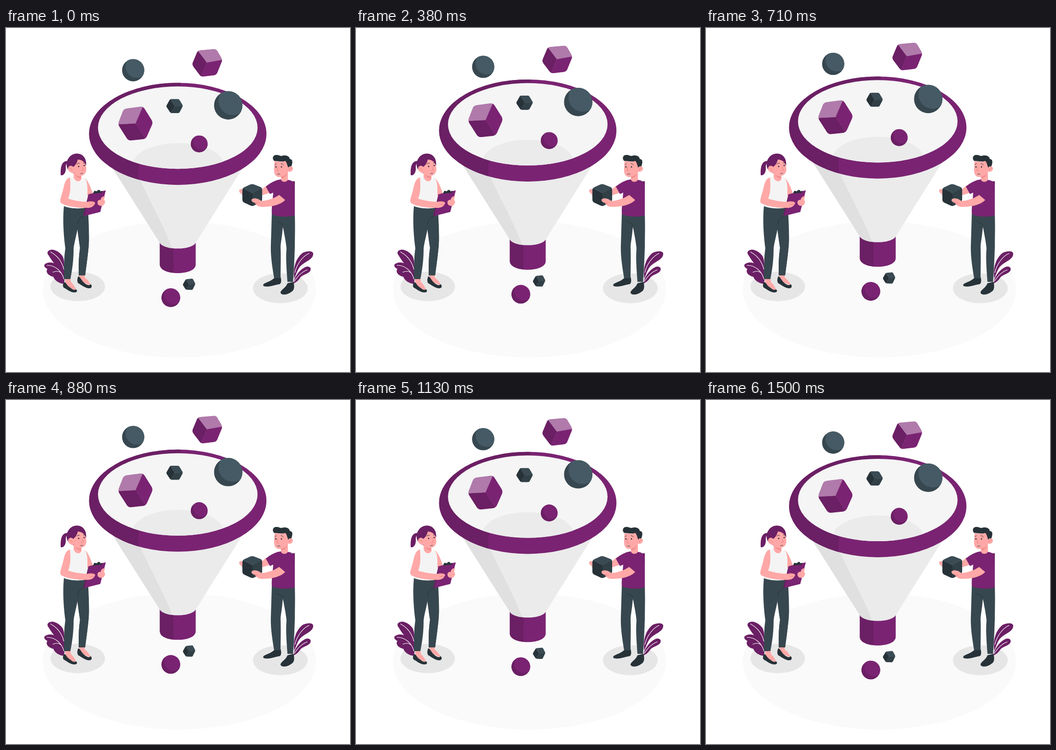
Write an HTML page that moves like this. It is 748x748 px and loops after 1540 ms.

```html
<!DOCTYPE html>
<html lang="en">
<head>
<meta charset="utf-8">
<title>Funnel</title>
<style>
  html, body { margin: 0; height: 100%; overflow: hidden; background: #fff; }
  svg { display: block; width: 100%; height: 100%; }
  .p { fill: #7a2372; } .pd { fill: #6b1f64; }
  .g { fill: #37474f; } .gd { fill: #263238; }
  .skin { fill: #ffa8a7; } .shade { fill: #f28f8f; }
  .line { fill: none; stroke-linecap: round; }
  .vein { stroke: #fff; stroke-width: 1.2; }
  .ink { stroke: #263238; stroke-width: 1; }
  .blush { stroke: #e87e80; stroke-width: 1; }
</style>
</head>
<body>
<svg viewBox="0 0 748 748">
  <defs>
    <clipPath id="rim"><ellipse cx="373.5" cy="231" rx="192.8" ry="111"/></clipPath>
    <clipPath id="mouth"><ellipse cx="373.5" cy="217.5" rx="173.5" ry="89.6"/></clipPath>
    <clipPath id="cone"><path d="M230 303L334.5 468C345 484.500 402 484.500 412.500 468L516 303Z"/></clipPath>
    <clipPath id="spout"><path d="M334.500 462H412.500V515C412.500 540 334.500 540 334.500 515Z"/></clipPath>
  </defs>

  <ellipse cx="377" cy="568.500" rx="297" ry="148" fill="#fafafa"/>
  <g fill="#e6e6e6">
    <ellipse cx="156" cy="562" rx="59.300" ry="32"/>
    <ellipse cx="596.500" cy="566" rx="59.500" ry="32.500"/>
  </g>

  <!-- plants -->
  <g class="pd">
    <path d="M127 531C111 524 100 506 91 492C88 486 94 482 101 482C110 483 118 489 123 496C127 504 127 516 127 531Z"/>
    <path d="M126 556C115 556 105 548 103 541C93 539 85 531 90 524C84 521 82 517 84 514C91 508 102 509 107 513C117 510 124 517 124 526C128 533 128 546 126 556Z"/>
    <path d="M627 545C623 521 631 500 645 489C655 484 669 484 668 492C667 504 650 508 641 517C634 524 631 535 627 545Z"/>
    <path d="M625 556C627 541 639 524 653 519C663 517 665 525 660 530C654 536 644 536 639 544C635 550 630 553 625 556Z"/>
  </g>
  <g class="line vein">
    <path d="M97 487C112 495 122 509 126 525"/>
    <path d="M89 516C107 516 121 528 126 546M102 531C109 528 115 528 120 533"/>
    <path d="M659 490C645 496 632 514 628 532M655 526C643 530 634 540 627 551"/>
  </g>

  <g id="float">
    <g clip-path="url(#spout)">
      <rect class="p" x="330" y="460" width="90" height="80"/>
      <rect class="pd" x="330" y="460" width="34" height="80"/>
    </g>
    <g clip-path="url(#cone)">
      <rect x="225" y="300" width="300" height="190" fill="#ebebeb"/>
      <path d="M225 300H281C290 340 345 430 362 482L330 485L225 320Z" fill="#e0e0e0"/>
    </g>
    <g clip-path="url(#rim)">
      <rect class="p" x="175" y="115" width="400" height="232"/>
      <path class="pd" d="M380 110H170V350H292C287 326 286 310 291 292L380 135Z"/>
    </g>
    <g clip-path="url(#mouth)">
      <rect x="195" y="125" width="360" height="190" fill="#f5f5f5"/>
      <ellipse cx="374" cy="300" rx="100" ry="49" fill="#ebebeb"/>
    </g>
  </g>

  <!-- woman -->
  <g>
    <path class="pd" d="M134 289C122 289 118 300 119 320C126 322 131 313 130 303C130 297 132 293 136 294Z"/>
    <path class="skin" d="M128 543H140L141 552C147 558 151 564 153 571L130 562Z"/>
    <path class="skin" d="M159 535H171V542C177 547 182 553 185 560L160 550Z"/>
    <path class="gd" d="M126 553C130 551 132 560 139 564C145 569 149 571 152 568C156 571 155 575 149 575C140 575 134 569 125 564C123 560 124 556 126 553Z"/>
    <path class="gd" d="M157 540C161 540 164 549 170 554C176 559 181 561 184 557C188 560 187 566 181 566C172 566 165 559 157 555C154 550 155 545 157 540Z"/>
    <path class="gd" d="M148 388L178 392C180 425 181 450 180 471C178 495 175 515 172 538H158C158 515 158 498 161 478C158 456 154 435 154 418Z"/>
    <path class="g" d="M155 395L177 392C179 425 181 450 180 471C178 495 175 515 172 538H158C158 515 158 498 161 478C158 460 156 445 156 428Z"/>
    <path class="g" d="M126 387C140 393 158 393 171 391C171 402 166 407 160 411C157 438 148 466 147 481C147 505 144 525 140 546H126C126 520 126 500 129 479C125 450 123 415 126 387Z"/>
    <path class="line ink" d="M156 427C156 417 161 412 169 409"/>
    <path class="skin" d="M169 326C178 328 183 345 189 359L178 366C173 353 168 340 169 326Z"/>
    <path fill="#f4f4f4" d="M139 325H148C152 336 165 337 169 325L174 330C178 342 177 354 177 363L171 391C156 394 140 392 127 388C132 376 135 367 134 350Z"/>
    <path class="skin" d="M147 309L163 313L164 324C167 333 153 339 147 325Z"/>
    <path class="shade" d="M150 318C154 322 158 323 163 322L163 326C157 327 152 324 150 318Z"/>
    <path class="pd" d="M133 304C128 289 139 273 154 273C168 273 176 285 174 300L147 316C141 314 136 311 133 304Z"/>
    <path class="skin" d="M146 302C151 299 155 292 156 286C164 286 172 291 174 300C176 309 174 316 169 319C162 324 150 321 147 315C141 316 135 311 135 306C135 300 142 297 146 302Z"/>
    <path class="line blush" d="M138 305C141 304 143 307 144 310M166 302L168 309L164 310"/>
    <g class="gd"><circle cx="158" cy="301" r="1.500"/><circle cx="170" cy="299" r="1.500"/></g>
    <path class="line ink" d="M154 296C156 294 158 294 160 294M168 293L172 294M162 317C164 316 166 316 167 316"/>
    <path class="p" d="M181 361L217 353L205 400L169 409Z"/>
    <path class="pd" d="M179 362L181 361L171 408L168 409Z"/>
    <path class="gd" d="M189 360L192 354L198 355C199 351 205 351 205 355L210 354L208 358Z"/>
    <path class="skin" d="M199 380C198 376 203 372 206 374C206 369 211 365 215 366L213 374C217 376 216 382 211 386C206 388 199 386 199 380Z"/>
    <path class="skin" d="M139 325C130 327 127 338 124 352C121 364 116 375 119 380C127 387 159 392 175 391C184 392 192 388 194 380C190 376 183 376 177 378C164 378 147 375 135 371C140 360 141 345 139 325Z"/>
    <path class="line blush" d="M181 379L191 378M182 384L192 383"/>
  </g>

  <!-- man -->
  <g>
    <path class="skin" d="M567 342L554 353L556 364L575 358Z"/>
    <path class="skin" d="M517 352L511 350C505 351 506 357 511 360L516 368L525 362Z"/>
    <path class="gd" d="M583 544L597 541C599 548 599 555 595 557C584 558 572 565 560 561C556 554 572 554 583 544Z"/>
    <path class="gd" d="M612 555L625 552C628 562 627 571 620 574C613 580 600 582 597 576C597 569 608 566 612 555Z"/>
    <path class="g" d="M578 403C592 410 613 411 628 406C629 435 628 455 628 477C627 505 626 530 624 552H612C610 525 608 500 610 479C608 460 604 444 602 430C601 450 598 463 597 475C598 500 597 523 597 544H583C578 515 575 492 576 469Z"/>
    <path class="line ink" d="M602 435V428L588 420"/>
    <path class="p" d="M599 329C586 330 574 337 565 345L574 361L581 358C580 375 577 390 578 405C592 411 613 412 628 407V354C629 342 626 333 617 331L612 330Z"/>
    <path class="pd" d="M628 333C615 333 602 350 599 358L607 374C616 365 627 352 628 347Z"/>
    <path class="p" d="M624 333C613 336 600 351 593 362L607 375C615 367 625 355 628 344Z"/>
    <path class="skin" d="M597 315L613 312V330C610 336 600 336 598 330Z"/>
    <path class="shade" d="M598 322C603 322 608 319 611 316C609 324 603 327 598 327Z"/>
    <path class="gd" d="M583 289C578 284 580 276 588 276C594 276 596 279 600 278C608 275 617 279 617 285C625 285 623 295 620 302L612 309L607 291Z"/>
    <path class="skin" d="M584 289C592 291 602 291 607 289C611 292 611 298 614 304C615 299 624 300 624 306C623 312 617 314 613 312C611 319 602 324 593 324C584 323 582 314 583 303Z"/>
    <path class="line blush" d="M616 309C616 306 618 304 621 304M591 303L589 310L593 311"/>
    <g class="gd"><circle cx="587" cy="302" r="1.500"/><circle cx="599" cy="302" r="1.500"/></g>
    <path class="line ink" d="M585 297L588 295M598 295C600 295 602 296 603 298M590 318C592 317 594 317 596 318"/>
    <g id="held"></g>
    <path class="skin" d="M594 363C582 371 566 376 555 376C548 370 538 368 534 373C533 377 537 379 541 380C545 387 551 389 557 389C576 389 597 385 607 374Z"/>
    <path class="line blush" d="M541 380L548 381"/>
  </g>
</svg>
<script>
const NS = 'http://www.w3.org/2000/svg';
const float = document.getElementById('float');
const held = document.getElementById('held');
const defs = document.querySelector('defs');
const plum = ['#6b1f64', '#7a2372', '#b07aab'];
const slate = ['#263238', '#313f46', '#3a4b54'];
let count = 0;

function add(parent, tag, attrs) {
  const el = document.createElementNS(NS, tag);
  for (const k in attrs) el.setAttribute(k, attrs[k]);
  parent.appendChild(el);
  return el;
}

function clipGroup(parent, tag, attrs) {
  const id = 'shape' + count++;
  add(add(defs, 'clipPath', { id }), tag, attrs);
  return add(parent, 'g', { 'clip-path': `url(#${id})` });
}

function ball(x, y, r, dark, light) {
  const g = clipGroup(float, 'circle', { cx: x, cy: y, r });
  add(g, 'circle', { cx: x, cy: y, r, fill: dark });
  add(g, 'circle', { cx: x + r * 0.32, cy: y - r * 0.32, r, fill: light });
}

// Closed polygon whose corners are rounded by distance r.
function roundPoly(pts, r) {
  const n = pts.length;
  const toward = (a, b) => {
    const k = r / Math.hypot(b[0] - a[0], b[1] - a[1]);
    return [a[0] + (b[0] - a[0]) * k, a[1] + (b[1] - a[1]) * k];
  };
  return pts.map((p, i) =>
    `${i ? 'L' : 'M'}${toward(p, pts[(i + n - 1) % n])}Q${p} ${toward(p, pts[(i + 1) % n])}`
  ).join('') + 'Z';
}

// hex: six corners in order; each face spans three of them and the middle.
function cube(parent, hex, mid, r, first, colors) {
  const g = clipGroup(parent, 'path', { d: roundPoly(hex, r) });
  colors.forEach((fill, i) => {
    const at = k => hex[(first + 2 * i + k) % 6];
    add(g, 'path', { d: `M${mid}L${at(0)}L${at(1)}L${at(2)}Z`, fill, stroke: fill, 'stroke-width': 0.4 });
  });
}

ball(276.5, 92.600, 24.300, '#37474f', '#455a64');
ball(483.200, 169, 31, '#37474f', '#455a64');
ball(420, 253, 18.500, plum[0], plum[1]);
ball(358.300, 587.200, 20.500, plum[0], plum[1]);

cube(float, [[417, 49.500], [457, 46], [471, 70], [457.500, 103], [424, 107], [404, 80.500]],
  [437, 76], 6, 4, [plum[0], plum[2], plum[1]]);
cube(float, [[256, 176.500], [298, 171], [320, 206], [304, 242], [266, 246], [243, 210]],
  [282, 208], 7, 3, [plum[0], plum[2], plum[1]]);
cube(float, [[357, 155], [376, 155], [385, 170], [376.500, 186], [358, 186], [348, 171]],
  [367, 171], 3, 4, [slate[0], slate[2], slate[1]]);
cube(float, [[391, 547], [406, 545.500], [412, 557], [405.500, 570.500], [391, 570], [384, 559]],
  [398, 558.500], 2.500, 4, [slate[0], slate[2], slate[1]]);
cube(held, [[535, 338.500], [557, 347], [557, 377], [536, 388], [514, 378], [514, 348]],
  [536, 359], 5, 3, [slate[0], slate[2], slate[1]]);

const LOOP = 1540, STEPS = 37, LIFT = 14.96;

// Linear rise and fall, stepped at about 24 frames a second.
function draw(ms) {
  const step = Math.floor((ms % LOOP) / LOOP * STEPS + 0.12);
  const phase = ((step + 1) % STEPS) / STEPS;
  const y = -LIFT * (1 - Math.abs(1 - 2 * phase));
  float.setAttribute('transform', `translate(0 ${y.toFixed(3)})`);
}

const start = performance.now();
function tick(now) {
  draw(Math.max(0, now - start));
  requestAnimationFrame(tick);
}
draw(0);
requestAnimationFrame(tick);
</script>
</body>
</html>
```
